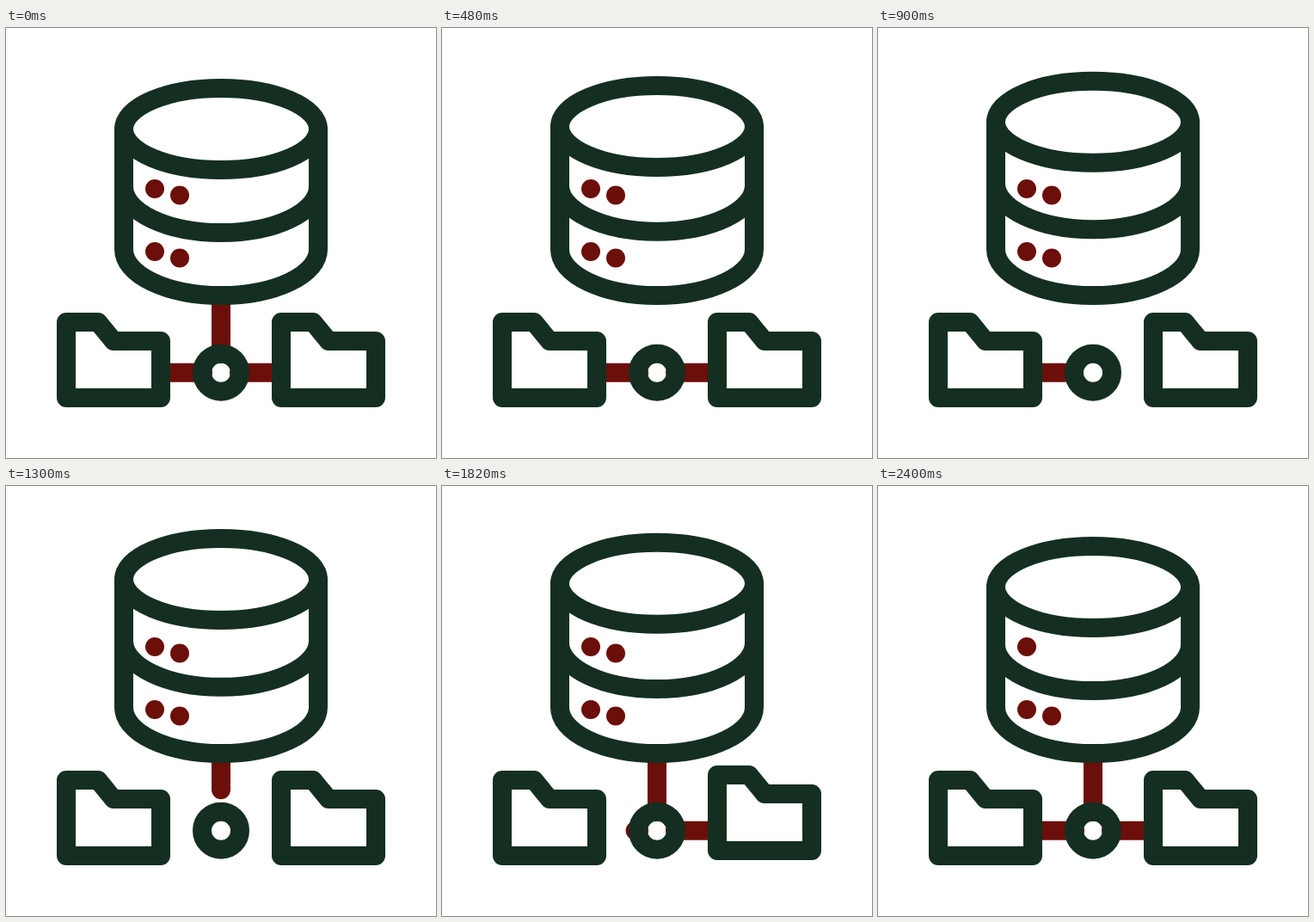
Recreate the animation shown at these times as an HTML page. Size 500 px wide and 500 px high, loop 2.42 s.

```html
<!DOCTYPE html>
<html lang="en">
<head>
<meta charset="utf-8">
<title>Shared database</title>
<style>
  html, body { margin: 0; width: 100%; height: 100%; overflow: hidden; background: #fff; }
  svg { display: block; width: 100%; height: 100%; }
  .ink, .wire { fill: none; stroke-width: 22; stroke-linecap: round; stroke-linejoin: round; }
  .ink { stroke: #142f21; }
  .wire { stroke: #6c0f0a; }
  .dot { fill: #6c0f0a; }
</style>
</head>
<body>
<svg viewBox="0 0 500 500">
  <defs>
    <path id="folder" d="M70 342H107L125 364H180V430H70Z"/>
  </defs>
  <path id="down" class="wire"/>
  <path id="right" class="wire"/>
  <path id="left" class="wire"/>
  <circle class="ink" cx="250" cy="400.7" r="22"/>
  <use id="folderL" class="ink" href="#folder"/>
  <use id="folderR" class="ink" href="#folder"/>
  <path id="shell" class="ink"/>
  <path id="shelf" class="ink"/>
  <ellipse id="lid" class="ink" cx="250" rx="113" ry="47.5"/>
  <circle class="dot" cx="173" cy="187" r="11"/>
  <circle id="blink" class="dot" cx="202" cy="194.5" r="11"/>
  <circle class="dot" cx="173" cy="260" r="11"/>
  <circle class="dot" cx="202" cy="267.5" r="11"/>
</svg>
<script>
const LOOP = 2420, STEP = 322, FIRST = 148;
const $ = id => document.getElementById(id);
const set = (id, name, value) => $(id).setAttribute(name, value);

const clamp = x => Math.max(0, Math.min(1, x));
const sine = x => (1 - Math.cos(Math.PI * clamp(x))) / 2;
const smooth = x => (x = clamp(x), x * x * x * (x * (6 * x - 15) + 10));

// Each wire retracts from its first point, then grows from it again.
const wires = [
  { id: "down", from: [250, 311], to: [250, 379] },
  { id: "right", from: [271, 400.7], to: [320, 400.7] },
  { id: "left", from: [229, 400.7], to: [180, 400.7] }
];

function drawWire({ id, from, to }, i, t) {
  const start = FIRST + i * STEP;
  const erase = sine((t - start) / STEP);
  const grow = sine((t - start - 3 * STEP) / STEP);
  const at = p => from.map((v, k) => v + (to[k] - v) * p).join(" ");
  const hidden = erase === 1 && grow === 0;
  const ends = grow > 0 ? [0, grow] : [erase, 1];
  set(id, "d", hidden ? "" : `M${at(ends[0])}L${at(ends[1])}`);
}

function hop(t, start) {
  const p = clamp((t - start) / 340);
  return -6 * Math.sin(Math.PI * p) ** 2;
}

const bowl = y => `A113 53.5 0 0 0 363 ${y}`;

function render(t) {
  const lift = 9 * (t < 1190 ? smooth(t / 1190) : smooth((2400 - t) / 1210));
  const top = 117.5 - lift, mid = 184.5 - lift * 0.47;
  set("lid", "cy", top);
  set("shell", "d", `M137 ${top}V257.5${bowl(257.5)}V${top}`);
  set("shelf", "d", `M137 ${mid}${bowl(mid)}`);

  wires.forEach((w, i) => drawWire(w, i, t));
  set("folderR", "transform", `translate(250 ${hop(t, 1663)})`);
  set("folderL", "transform", `translate(0 ${hop(t, 1985)})`);
  set("blink", "visibility", t >= 2380 ? "hidden" : "visible");
}

let begin = null;
function tick(now) {
  if (begin === null) begin = now;
  render(Math.max(0, now - begin) % LOOP);
  requestAnimationFrame(tick);
}
render(0);
requestAnimationFrame(tick);
</script>
</body>
</html>
```
